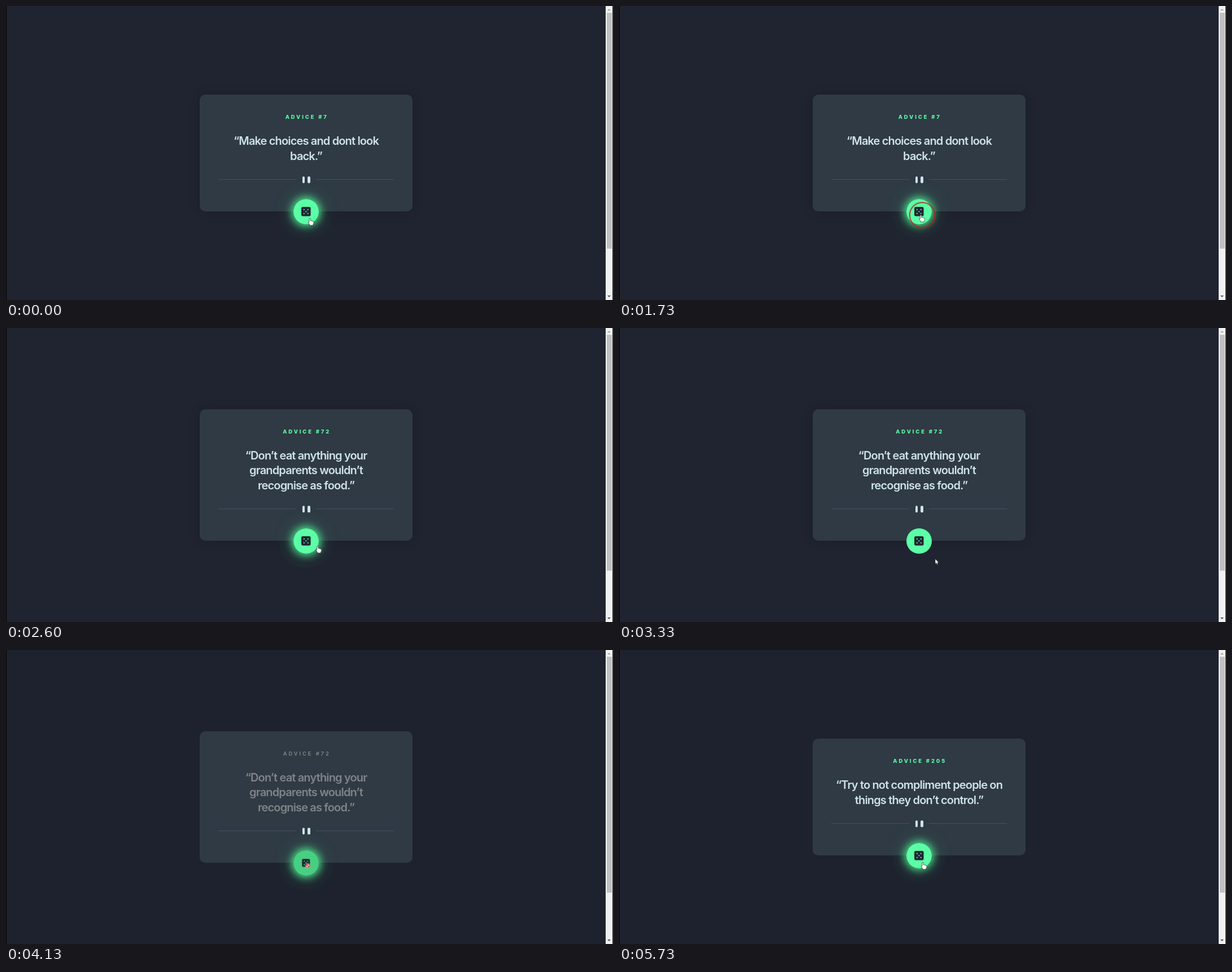
These frames come from a looping animation (1075x521 px, 5.8 s). An HTML page:

```html
<!DOCTYPE html>
<html lang="en">
<head>
<meta charset="utf-8">
<title>Advice generator</title>
<style>
:root { --green: #5bffa6; --pale: #cee3e9; --loop: 5800ms infinite; }
html, body { margin: 0; width: 100%; height: 100%; overflow: hidden; }
body { position: relative; background: #202430; font-family: Inter, sans-serif; animation: page var(--loop) step-end; }
body *, .divider::before, .divider::after { position: absolute; box-sizing: border-box; }
br { position: static !important; }

.edge { left: 0; top: 0; width: 1px; height: 100%; background: #000; }
.scroll { left: 1062px; top: 0; width: 13px; height: 100%; background: #f1f1f1; border-right: 1px solid #20222a; }
.thumb { left: 1.5px; top: 11.5px; width: 9px; height: 418px; background: #c1c1c1; }
.tri { left: 3px; border: 3px solid transparent; }
.up { top: 2px; border-bottom-color: #a3a3a3; }
.down { bottom: 2px; border-top-color: #505050; }

.card { left: 343px; width: 377px; top: 157px; height: 207px; border-radius: 10px; background: #2f3a44;
  box-shadow: 0 0 18px var(--shade); animation: card var(--loop) step-end; }
.advice { inset: 0; visibility: hidden; text-align: center; white-space: nowrap; }
.a { animation: first var(--loop) step-end; }
.b { animation: second var(--loop) step-end; }
.c { animation: third var(--loop) step-end; }
h1, p { margin: 0; width: 100%; left: 0; }
h1 { top: 33px; left: 1.2px; font-size: 9.4px; line-height: 14px; font-weight: 800; letter-spacing: 2.9px; color: var(--green);
  animation: label var(--loop) step-end; }
p { top: 69px; font-size: 20px; line-height: 26.8px; font-weight: 600; letter-spacing: -.85px; color: var(--pale);
  animation: quote var(--loop) step-end; }

.divider { left: 33px; right: 33px; bottom: 50px; height: 13px; }
.divider::before, .divider::after { content: ""; top: 6px; width: 138px; height: 1px; background: #435068; }
.divider::before { left: 0; }
.divider::after { right: 0; }
.bar { left: 148.5px; top: .5px; width: 4.6px; height: 12px; border-radius: 2.2px; background: var(--pale); }
.bar + .bar { left: 158.4px; }

.button { left: 166px; bottom: -22.5px; width: 45px; height: 45px; border-radius: 50%; background: var(--green);
  animation: press var(--loop) linear; }
.glow { inset: 0; border-radius: 50%; box-shadow: 0 0 14px 3px #4be08c, 0 0 34px 3px rgba(75,224,140,.3);
  animation: hover var(--loop) linear; }
.die { left: 14.2px; top: 14.2px; width: 16.6px; height: 16.6px; animation: shrink var(--loop) linear; }

.cursor { left: 0; top: 0; width: 0; height: 0; animation: move var(--loop) linear; }
.cursor svg { overflow: visible; left: 0; top: 0; width: 1px; height: 1px; visibility: hidden; }
.hand { animation: hand var(--loop) step-end; }
.arrow { animation: arrow var(--loop) step-end; }
.stop { animation: stop var(--loop) step-end; }
.ring { left: -21px; top: -23.5px; width: 47px; height: 47px; border: 2px solid rgba(190,30,32,.85); border-radius: 50%; opacity: 0;
  animation: ring var(--loop) linear; }

@keyframes page {
  0%, 40.17% { background: #202430; --shade: rgba(0,0,0,.17) }
  31.03%, 65.52%, 100% { background: #1e222e; --shade: transparent }
}
@keyframes card {
  0%, 72.41%, 100% { top: 157px; height: 207px }
  35.52% { top: 143.6px; height: 233.8px }
}
@keyframes first { 0% { visibility: visible } 35.52%, 100% { visibility: hidden } }
@keyframes second { 0%, 72.41%, 100% { visibility: hidden } 35.52% { visibility: visible } }
@keyframes third { 0% { visibility: hidden } 72.41%, 100% { visibility: visible } }
@keyframes label {
  0%, 35.52%, 72.41%, 100% { color: var(--green); font-weight: 800 }
  31.03%, 65.52% { color: #85878b; font-weight: 600 }
}
@keyframes quote { 0%, 35.52%, 72.41%, 100% { color: var(--pale) } 31.03%, 65.52% { color: #818387 } }
@keyframes press {
  0%, 31%, 38.8%, 64.8%, 75.8%, 100% { background: var(--green) }
  32.2%, 35.5%, 66%, 72.4% { background: #48cf81 }
  36.7%, 73.6% { background: #7beba5 }
}
@keyframes shrink {
  0%, 31%, 36.7%, 64.8%, 73.6%, 100% { transform: none }
  32.2%, 35.5%, 66%, 72.4% { transform: scale(.85) }
}
@keyframes hover {
  0%, 5%, 26.4%, 45%, 63.8%, 83%, 98.7%, 100% { opacity: 1 }
  9%, 23.8%, 49.3%, 61.4%, 87%, 96.4% { opacity: 0 }
}
@keyframes move {
  0%, 1% { transform: translate(538px, 376px) }
  10.3% { transform: translate(560px, 403px) }
  13.8%, 19.5% { transform: translate(582px, 408px) }
  26.4%, 34.5% { transform: translate(534.5px, 370px) }
  36.7%, 41% { transform: translate(542px, 372px) }
  49.3% { transform: translate(563px, 402px) }
  53% { transform: translate(570px, 416px) }
  57.4%, 59.7% { transform: translate(560px, 409px) }
  64%, 75.8% { transform: translate(534.5px, 382.5px) }
  81.5% { transform: translate(546px, 384px) }
  90.7%, 92% { transform: translate(562px, 434px) }
  98.7%, 100% { transform: translate(538px, 376px) }
}
@keyframes hand {
  0%, 24.6%, 35.52%, 62.6%, 72.41%, 97%, 100% { visibility: visible }
  5.2%, 31.03%, 46%, 65.52%, 83% { visibility: hidden }
}
@keyframes arrow {
  0%, 24.6%, 62.6%, 97%, 100% { visibility: hidden }
  5.2%, 46%, 83% { visibility: visible }
}
@keyframes stop {
  0%, 35.52%, 72.41%, 100% { visibility: hidden }
  31.03%, 65.52% { visibility: visible }
}
@keyframes ring {
  0%, 29.7% { opacity: 0; transform: none }
  29.71% { opacity: 1; transform: none }
  33.5% { opacity: 1; transform: scale(.74) }
  33.51%, 64.2% { opacity: 0; transform: none }
  64.21% { opacity: 1; transform: none }
  68% { opacity: 1; transform: scale(.74) }
  68.01%, 100% { opacity: 0; transform: none }
}
</style>
</head>
<body>
<div class="edge"></div>
<div class="scroll">
  <div class="tri up"></div>
  <div class="thumb"></div>
  <div class="tri down"></div>
</div>

<main class="card">
  <section class="advice a"><h1>ADVICE #7</h1><p>“Make choices and dont look<br>back.”</p></section>
  <section class="advice b"><h1>ADVICE #72</h1><p>“Don’t eat anything your<br>grandparents wouldn’t<br>recognise as food.”</p></section>
  <section class="advice c"><h1>ADVICE #205</h1><p>“Try to not compliment people on<br>things they don’t control.”</p></section>
  <div class="divider"><i class="bar"></i><i class="bar"></i></div>
  <div class="button">
    <div class="glow"></div>
    <svg class="die" viewBox="0 0 24 24">
      <rect width="24" height="24" rx="4" fill="#202733"/>
      <path d="M7 7h.01M17 7h.01M12 12h.01M7 17h.01M17 17h.01" stroke="#5bffa6" stroke-width="3.2" stroke-linecap="round"/>
    </svg>
  </div>
</main>

<div class="cursor">
  <div class="ring"></div>
  <svg class="hand"><path d="M-1.2 1Q0-.6 1.2 1V4.6L2.6 4.4 3.4 5.1 4.7 4.9 5.4 5.7Q6.8 5.4 7 6.8V9.2L5.8 11.2V12.8H-.2V11.4L-2.9 7.8Q-3 6.4-1.2 7.2Z" fill="#fff" stroke="#222" stroke-width=".7"/></svg>
  <svg class="arrow"><path d="M0 0V9.2L2.1 7.4 3.5 10.4 5 9.7 3.7 6.8H6.5Z" fill="#fff" stroke="#111" stroke-width=".6"/></svg>
  <svg class="stop"><circle r="4.4" fill="#fff"/><circle r="3.3" fill="#f3e9e9" stroke="#b3262e" stroke-width="1.3"/><path d="M-2.3-2.3 2.3 2.3" stroke="#b3262e" stroke-width="1.3"/></svg>
</div>
</body>
</html>
```
